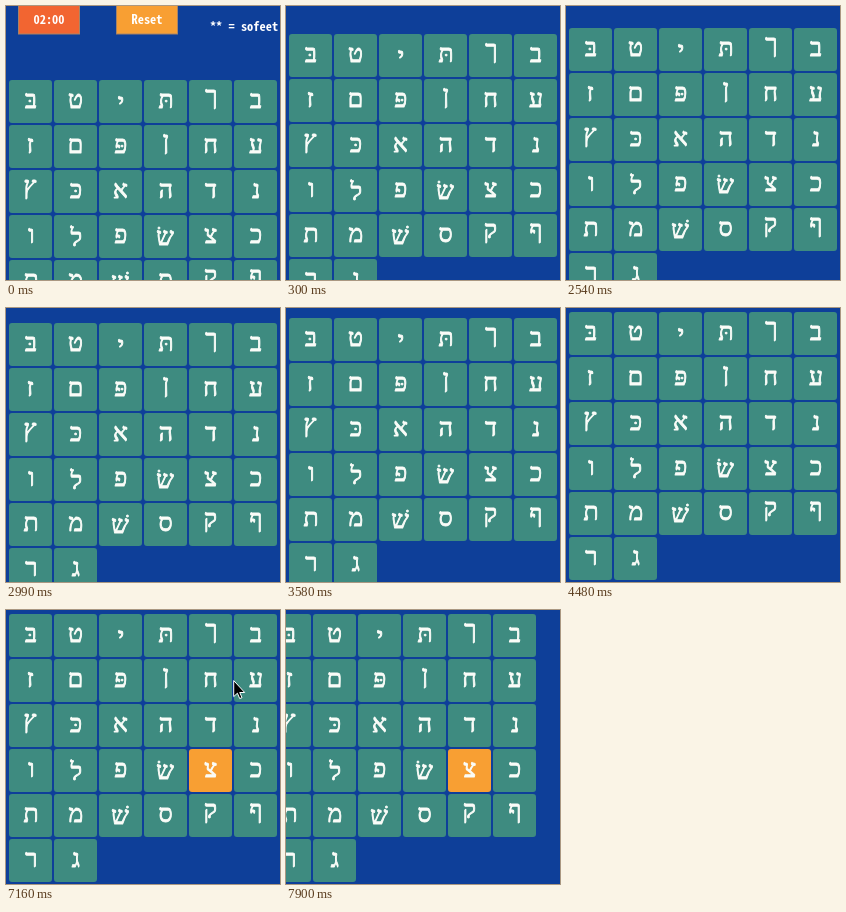
Recreate the animation shown at these times as an HTML page. Size 274 by 274 pixels, loop 8000 ms.

```html
<!DOCTYPE html>
<html lang="en">
<head>
<meta charset="utf-8">
<title>Hebrew letter board</title>
<style>
  html, body { margin: 0; width: 100%; height: 100%; overflow: hidden; background: #0e3f99; }
  svg { display: block; width: 100vw; height: 100vh; }
  text { text-anchor: middle; }
  .label { fill: #fff; font-weight: 700; }
  .letter { fill: #fafcf8; stroke: #fafcf8; stroke-width: .9; stroke-linejoin: round; }
</style>
</head>
<body>
<svg viewBox="0 0 274 274">
  <g id="header"></g>
  <g id="board"></g>
  <path id="cursor" d="M0 0V16L3.7 12.6L6 18L8.3 17L6 11.9H11Z"
    fill="#000" stroke="#fff" stroke-width="1" stroke-linejoin="round"/>
</svg>
<script>
const LOOP = 8000, FRAME = 149;
const PITCH = 45, TILE = 43, HEADER_GAP = 74;
const LETTER_HEIGHT = 14.6, LABEL_ADVANCE = 6.2;
const GREEN = '#3e8b80', AMBER = '#f89f33', RED = '#f26531';
const SERIF = '"Liberation Serif", "Noto Serif", serif';
const MONO = '"Noto Sans Mono CJK JP", "Noto Sans Mono", monospace';
const ROWS = ['בּ ט י תּ ך ב', 'ז ם פּ ן ח ע', 'ץ כּ א ה ד נ', 'ו ל פ שׂ צ כ', 'ת מ שׁ ס ק ף', 'ר ג'];
const PICKED = 'צ', DESCENDING = 'ךןץףק';

const byId = id => document.getElementById(id);
const header = byId('header'), board = byId('board'), cursor = byId('cursor');

function add(parent, tag, attrs, text = '') {
  const node = document.createElementNS('http://www.w3.org/2000/svg', tag);
  for (const key in attrs) node.setAttribute(key, attrs[key]);
  node.textContent = text;
  return parent.appendChild(node);
}

const pen = document.createElement('canvas').getContext('2d');
pen.textAlign = 'center';

function measure(font, text) {
  pen.font = font;
  const m = pen.measureText(text);
  return { width: m.width, left: m.actualBoundingBoxLeft, right: m.actualBoundingBoxRight,
    up: m.actualBoundingBoxAscent, down: m.actualBoundingBoxDescent };
}

const labelSize = 100 * LABEL_ADVANCE / measure(`700 100px ${MONO}`, '0').width;

function label(x, y, text) {
  add(header, 'text', { x, y, class: 'label', 'font-family': MONO, 'font-size': labelSize }, text);
}

function button(x, text, fill) {
  add(header, 'rect', { x: x + .5, y: -2, width: 61, height: 30, fill, stroke: '#a68468' });
  label(x + 31, 18, text);
}

button(12, '02:00', RED);
button(110, 'Reset', AMBER);
label(238, 25, '** = sofeet');

// Letters share one size and are centred on their ink, not on the baseline.
const probe = measure(`100px ${SERIF}`, 'ב');
const letterSize = 100 * LETTER_HEIGHT / (probe.up + probe.down);

function letter(char, cx, cy) {
  const ink = measure(`100px ${SERIF}`, char), scale = letterSize / 200;
  const lift = DESCENDING.includes(char) ? 2.2 : .6;
  add(board, 'text', {
    x: cx + (ink.left - ink.right) * scale,
    y: cy + (ink.up - ink.down) * scale - lift,
    class: 'letter', 'font-family': SERIF, 'font-size': letterSize
  }, char);
}

let pickedTile;
ROWS.forEach((row, r) => row.split(' ').forEach((char, c) => {
  const x = 3 + c * PITCH, y = r * PITCH;
  const tile = add(board, 'rect', { x, y, width: TILE, height: TILE, rx: 3, fill: GREEN });
  if (char === PICKED) pickedTile = tile;
  letter(char, x + TILE / 2, y + TILE / 2);
}));

// Straight travel between [time, ...values] points.
function along(points, t) {
  const next = points.findIndex(p => p[0] > t);
  if (next < 0) return points.at(-1).slice(1);
  if (next === 0) return points[0].slice(1);
  const [t0, ...from] = points[next - 1], [t1, ...to] = points[next];
  return from.map((v, i) => v + (to[i] - v) * (t - t0) / (t1 - t0));
}

const SCROLL = [[0, 74], [300, 28], [2100, 28], [2990, 15], [3580, 10], [4030, 6], [4200, 6], [4480, 4]];
const PAN = [[7600, 0], [7900, -21]];
const POINTER = [[5810, 218, 186.5], [6110, 200, 167.5], [6410, 200, 167.5], [6560, 195, 167.5],
  [6850, 195, 167.5], [7450, 260, -25]];
const POINTER_IN = 5810, PICK = 6850;

function draw(time) {
  const t = Math.floor(time / FRAME) * FRAME;
  const top = Math.round(along(SCROLL, t)[0]), pan = Math.round(along(PAN, t)[0]);
  board.setAttribute('transform', `translate(${pan} ${top})`);
  header.setAttribute('transform', `translate(${pan} ${top - HEADER_GAP})`);
  cursor.setAttribute('transform', `translate(${along(POINTER, t)})`);
  cursor.setAttribute('visibility', t < POINTER_IN ? 'hidden' : 'visible');
  pickedTile.setAttribute('fill', t < PICK ? GREEN : AMBER);
}

const start = performance.now();
function tick() {
  draw((performance.now() - start) % LOOP);
  requestAnimationFrame(tick);
}
tick();
</script>
</body>
</html>
```
